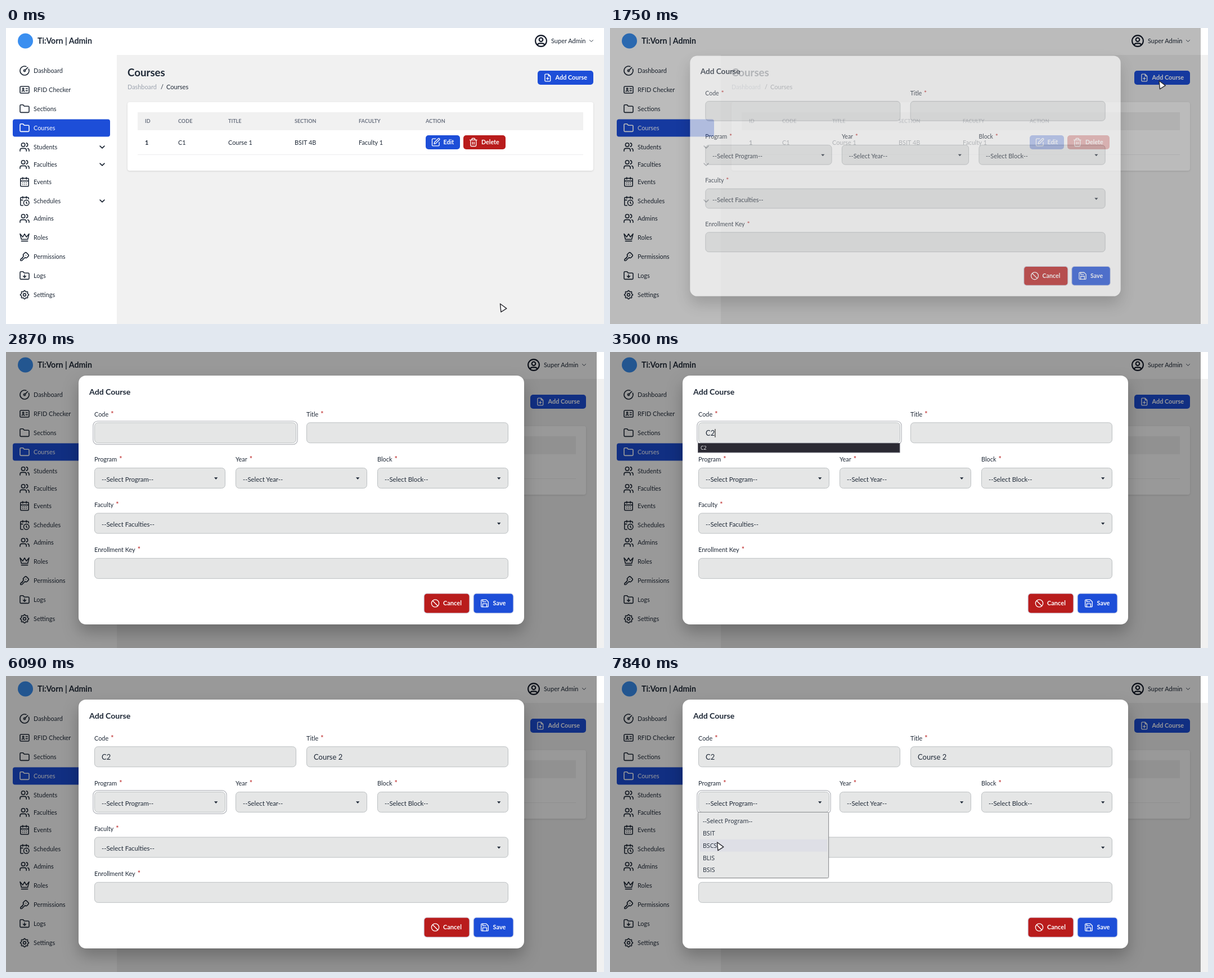
These frames come from a looping animation (1063 by 527 pixels, 8 s). An HTML page:

```html
<!DOCTYPE html>
<html lang="en">
<head>
<meta charset="utf-8">
<title>Course admin</title>
<style>
  html, body { margin: 0; width: 100%; height: 100%; overflow: hidden; background: #fff; }
  svg { display: block; width: 100%; height: 100%; }
  text { white-space: pre; }
  .card { filter: drop-shadow(0 1px 1.5px rgba(0, 0, 0, .12)); }
  .dialog { filter: drop-shadow(0 14px 14px rgba(0, 0, 0, .25)); }
</style>
</head>
<body>
<svg id="stage" viewBox="0 0 1063 527" preserveAspectRatio="none"></svg>
<script>
const LOOP = 8000, OPEN = 1690, GUTTER = 13;
const BLUE = '#1d4ed8', RED = '#b91c1c', INK = '#1f2937', FIELD = '#e5e6e6', PAGE = '#f1f1f1';
const UI = 'Lato, sans-serif', NATIVE = 'Open Sans, sans-serif';
const stage = document.getElementById('stage');
const pen = document.createElement('canvas').getContext('2d');

// Icons on a 24 unit grid
const ring = (x, y, r) => `M${x - r} ${y}a${r} ${r} 0 1 0 ${2 * r} 0a${r} ${r} 0 1 0 ${-2 * r} 0z`;
const gear = 'M' + Array.from({ length: 97 }, (_, i) => {
  const a = i / 96 * 2 * Math.PI, r = 8.3 + 1.1 * Math.cos(8 * a);
  return (12 + r * Math.cos(a)).toFixed(2) + ' ' + (12 + r * Math.sin(a)).toFixed(2);
}).join('L') + 'z';
const folder = 'M4 20h16a2 2 0 0 0 2-2V8a2 2 0 0 0-2-2h-7.9a2 2 0 0 1-1.7-.9l-.8-1.2A2 2 0 0 0 7.9 3H4a2 2 0 0 0-2 2v13a2 2 0 0 0 2 2z';
const icons = {
  gauge: 'M15.6 2.7a10 10 0 1 0 5.7 5.7M13.4 10.6 19 5' + ring(12, 12, 2),
  badge: 'M4 4.5h16a2 2 0 0 1 2 2v11a2 2 0 0 1-2 2H4a2 2 0 0 1-2-2v-11a2 2 0 0 1 2-2zM6 15.5q3-3 6 0M15 9.5h3.5M15 14h3.5' + ring(9, 10, 1.6),
  folder,
  users: 'M16 21v-2a4 4 0 0 0-4-4H6a4 4 0 0 0-4 4v2M22 21v-2a4 4 0 0 0-3-3.9M16 3.1a4 4 0 0 1 0 7.8' + ring(9, 7, 4),
  calendar: 'M5 4h14a2 2 0 0 1 2 2v14a2 2 0 0 1-2 2H5a2 2 0 0 1-2-2V6a2 2 0 0 1 2-2zM16 2v4M8 2v4M3 10h18M8 14h.01M12 14h.01M16 14h.01M8 18h.01M12 18h.01M16 18h.01',
  schedule: 'M21 7.5V6a2 2 0 0 0-2-2H5a2 2 0 0 0-2 2v14a2 2 0 0 0 2 2h3.5M16 2v4M8 2v4M3 10h5M17.5 17.5 16 16.2V14' + ring(16, 16, 6),
  crown: 'M2 4l3 12h14l3-12-6 7-4-7-4 7zM5 20h14',
  key: 'M16.5 3.8l3.6 3.6a2.9 2.9 0 0 1 0 4.1l-2.6 2.6a2.9 2.9 0 0 1-4.1 0l-.3-.3-6.5 6.6a2 2 0 0 1-1.4.6H4a1 1 0 0 1-1-1v-1.2a2 2 0 0 1 .6-1.4L4 17h2v-2h2v-2l2.1-2.1-.3-.3a2.9 2.9 0 0 1 0-4.1l2.6-2.7a2.9 2.9 0 0 1 4.1 0zM15 9h.01',
  download: folder + 'M12 10v6M9 13l3 3 3-3',
  gear: gear + ring(12, 12, 3),
  user: ring(12, 12, 9) + ring(12, 10, 3) + 'M6.2 18.8a4 4 0 0 1 3.8-2.8h4a4 4 0 0 1 3.8 2.8',
  addFile: 'M14 3v4a1 1 0 0 0 1 1h4M17 21H7a2 2 0 0 1-2-2V5a2 2 0 0 1 2-2h7l5 5v11a2 2 0 0 1-2 2zM12 11v6M9 14h6',
  edit: 'M12 3H5a2 2 0 0 0-2 2v14a2 2 0 0 0 2 2h14a2 2 0 0 0 2-2v-7M18.4 2.6a2.1 2.1 0 0 1 3 3L12 15l-4 1 1-4z',
  trash: 'M3 6h18M19 6v14a2 2 0 0 1-2 2H7a2 2 0 0 1-2-2V6M8 6V4a2 2 0 0 1 2-2h4a2 2 0 0 1 2 2v2M10 11v6M14 11v6',
  ban: ring(12, 12, 9.5) + 'M5.3 5.3l13.4 13.4',
  save: 'M19 21H5a2 2 0 0 1-2-2V5a2 2 0 0 1 2-2h11l5 5v11a2 2 0 0 1-2 2zM17 21v-8H7v8M7 3v5h8',
  chevron: 'M6 9l6 6 6-6'
};

// Drawing helpers
const rect = (x, y, w, h, r, fill, extra = '') =>
  `<rect x="${x}" y="${y}" width="${w}" height="${h}" rx="${r}" fill="${fill}" ${extra}/>`;
const text = (x, y, str, size = 10.9, fill = INK, weight = 400, font = UI) =>
  `<text x="${x}" y="${y}" font-size="${size}" fill="${fill}" font-weight="${weight}" font-family="${font}">${str}</text>`;
const icon = (name, cx, cy, scale = .8, color = INK, width = 2) =>
  `<path d="${icons[name]}" transform="translate(${cx} ${cy}) scale(${scale}) translate(-12 -12)" fill="none" stroke="${color}" stroke-width="${width}" stroke-linecap="round" stroke-linejoin="round"/>`;
const button = (x, y, w, h, fill, name, label, labelX, size = 10.7, extra = '') =>
  rect(x, y, w, h, 5, fill, extra) + icon(name, x + (h > 30 ? 20 : 17.8), y + h / 2, .7, '#fff', 1.9) +
  text(labelX, y + h / 2 + 3.8, label, size, '#fff', 700);

// Timeline
const clamp = v => Math.min(1, Math.max(0, v));
const smooth = v => v * v * (3 - 2 * v);
const lerp = (a, b, p) => a + (b - a) * p;
const latest = (keys, t) => keys.filter(k => k[0] <= t).pop();

const pointerPath = [
  [640, 878.5, 491], [1400, 981.5, 91.5], [OPEN, 981.5, 91.5], [1820, 969.5, 97], [2370, 410, 141],
  [6400, 410, 140], [6790, 211.5, 224], [7170, 211.5, 224], [7490, 214, 349], [7600, 214, 349], [7840, 190.5, 296]
];
function pointerAt(t) {
  const next = pointerPath.findIndex(k => k[0] > t);
  if (next === 0) return pointerPath[0].slice(1);
  if (next < 0) return pointerPath.at(-1).slice(1);
  const [t0, x0, y0] = pointerPath[next - 1], [t1, x1, y1] = pointerPath[next];
  const p = smooth((t - t0) / (t1 - t0));
  return [lerp(x0, x1, p), lerp(y0, y1, p)];
}

const inputs = [
  { x: 157, leave: 3780, keys: [[2370, ''], [3010, 'C'], [3360, 'C2']],
    history: ['C1', 'C2', 'C3', 'C4', 'C5', 'C6'] },
  { x: 534, leave: 6090,
    keys: [[3780, ''], [4550, 'C'], [4690, 'Co'], [4900, 'Cou'], [4970, 'Cour'], [5040, 'Cours'],
      [5180, 'Course'], [5390, 'Course '], [5600, 'Course 2']],
    history: ['Cap', 'Capstone', 'Capstone Project 1', 'Capstone Project 2', 'Computer Programming',
      'Computer Programming 2', 'Course 1', 'Course 2', 'Course 3'] }
];

const menu = [
  ['gauge', 'Dashboard', 76], ['badge', 'RFID Checker', 110], ['folder', 'Sections', 144], ['folder', 'Courses', 178],
  ['users', 'Students', 212, 1], ['users', 'Faculties', 243, 1], ['calendar', 'Events', 274],
  ['schedule', 'Schedules', 308, 1], ['users', 'Admins', 339], ['crown', 'Roles', 373],
  ['key', 'Permissions', 407], ['download', 'Logs', 441], ['gear', 'Settings', 475]
];
const columns = [
  [247, 'ID', '1'], [306, 'CODE', 'C1'], [395, 'TITLE', 'Course 1'], [513, 'SECTION', 'BSIT 4B'],
  [627, 'FACULTY', 'Faculty 1'], [746, 'ACTION', '']
];

function page(t, [px, py]) {
  const open = t >= OPEN, shift = open ? GUTTER : 0;
  const hover = !open && px > 945 && py < 101;
  const press = t >= 1660 && !open ? .97 : 1;
  const sidebar = menu.map(([name, label, y, nested]) => {
    const active = label === 'Courses', color = active ? '#fff' : INK;
    return (active ? rect(12, 162.5, 173, 31, 4, BLUE) : '') + icon(name, 33, y, .8, color) +
      text(49, y + 4, label, 10.9, color) + (nested ? icon('chevron', 171, y, .65, INK, 2.6) : '');
  }).join('');
  const table = columns.map(([x, head, cell], i) =>
    text(x, 168.8, head, 9.1, '#6b7280', 700) + text(x, 207.5, cell, 10.9, INK, i ? 400 : 700)).join('');
  return rect(0, 0, 1063, 527, 0, '#fff') + rect(197, 48, 866, 479, 0, PAGE) +
    '<circle cx="34.5" cy="23" r="13.5" fill="#3b8ff0"/>' +
    text(56, 28, 'Ti:Vorn | Admin', 14.2, INK, 700) +
    icon('user', 951 - shift, 23, 1.1, '#111827', 1.9) + text(969 - shift, 27, 'Super Admin', 11) +
    icon('chevron', 1040.5 - shift, 23, .5, INK, 1.8) + sidebar +
    text(216, 86, 'Courses', 18.7, INK, 700) + text(216, 109.3, 'Dashboard', 10.9, '#9ca3af') +
    text(275, 109.3, '/') + text(285, 109.3, 'Courses', 11.1) +
    `<g transform="translate(${994.5 - shift} 88.5) scale(${press}) translate(-994.5 -88.5)">` +
    button(945, 76, 99, 25, hover ? '#3b82f6' : BLUE, 'addFile', 'Add Course', 976.5, 10.9) + '</g>' +
    rect(216, 132, 828 - shift, 122, 4, '#fff', 'class="card"') + rect(234, 150, 792 - shift, 32, 0, PAGE) +
    rect(234, 225, 792 - shift, 1, 0, '#ededee') + table +
    button(746, 191, 61, 25, BLUE, 'edit', 'Edit', 777.5) +
    button(813, 191, 75, 25, RED, 'trash', 'Delete', 845);
}

const label = (x, y, str) => text(x, y, `${str}<tspan dx="4" font-size="12.5" fill="${RED}">*</tspan>`);
const field = (x, y, w, focused) =>
  (focused ? rect(x - 2.2, y - 2.2, w + 4.4, 41.4, 8, '#fff', 'stroke="#bcbec3" stroke-width="1.4"') : '') +
  rect(x + .5, y + .5, w - 1, 36, 6, FIELD, 'stroke="#bcc0c2"');
const select = (x, y, w, str, focused) => field(x, y, w, focused) + text(x + 13, y + 24.6, str, 11.4) +
  `<path d="M${x + w - 20} ${y + 17.3}h6.4l-3.2 3.6z" fill="${INK}"/>`;

function suggestions(x, items) {
  const shown = items.slice(0, 6), h = shown.length * 15.4 + 1;
  const bar = items.length > 6
    ? rect(x + 344.5, 175.5, 13, 22, 0, '#8f8f96') +
      `<path d="M${x + 347.5} 171l3-3 3 3M${x + 347.5} 248l3 3 3-3" fill="none" stroke="#a5a5ad" stroke-width="1.4"/>` : '';
  return rect(x - .5, 162.5, 358.5, h, 0, '#2b2a33', 'stroke="#5b5b66"') +
    shown.map((s, i) => text(x + 4, 174.2 + i * 15.45, s, 8.8, '#fbfbfe', 400, NATIVE)).join('') + bar;
}

function textInput({ x, leave, keys, history }, t) {
  const key = latest(keys, t), focused = key && t < leave;
  const value = key ? key[1] : '';
  let box = field(x, 125.3, 359, focused) + text(x + 13, 148.8, value, 13), popup = '';
  if (focused) {
    pen.font = '13px ' + UI;
    const end = x + 13.2 + pen.measureText(value).width;
    if ((t - key[0]) % 1000 < 495) box += rect(end, 137, 1, 15, 0, '#111');
    if (value) popup = suggestions(x, history.filter(s => s.startsWith(value)));
  }
  return [box, popup];
}

function programList(y) {
  const row = Math.max(0, Math.floor((y - 247) / 21.9));
  return rect(156.5, 242.5, 232, 117, 2, '#e6e7e7', 'stroke="#8d8f92" class="card"') +
    rect(160, 247 + row * 21.9, 226, 21.9, 0, '#dedfe6') +
    ['--Select Program--', 'BSIT', 'BSCS', 'BLIS', 'BSIS'].map((s, i) =>
      text(165, 261.8 + i * 21.9, s, 10.6, INK, 400, NATIVE)).join('');
}

function dialog(t, pointer) {
  const p = 1 - (1 - clamp((t - OPEN) / 200)) ** 3;
  const [code, title] = inputs.map(input => textInput(input, t));
  const edge = 'stroke="#d5d9ea" stroke-width="1.2"';
  return rect(0, 0, 1050, 527, 0, '#000', `opacity="${.4 * p}"`) +
    `<g opacity="${p}" transform="translate(525 263.5) scale(${.9 + .1 * p}) translate(-525 -263.5)">` +
    rect(129, 42, 792, 443, 13, '#fff', 'class="dialog"') + text(148, 76.2, 'Add Course', 14.1, INK, 700) +
    label(157, 114.8, 'Code') + label(534, 114.8, 'Title') + code[0] + title[0] +
    label(157, 195, 'Program') + label(408, 195, 'Year') + label(660, 195, 'Block') +
    select(157, 206, 233, '--Select Program--', t >= 6090) + select(408, 206, 234, '--Select Year--') +
    select(660, 206, 233, '--Select Block--') +
    label(157, 275.6, 'Faculty') + select(157, 286.5, 736, '--Select Faculties--') +
    label(157, 356, 'Enrollment Key') + field(157, 366.8, 736) +
    button(743, 430, 81, 35, RED, 'ban', 'Cancel', 777, 11, edge) +
    button(831, 430, 71, 35, BLUE, 'save', 'Save', 865.5, 11, edge) +
    code[1] + title[1] + (t >= 7000 ? programList(pointer[1]) : '') + '</g>';
}

function scene(t) {
  const pointer = pointerAt(t), hidden = t >= 2370 && t < 6430;
  return page(t, pointer) + (t >= OPEN ? dialog(t, pointer) : '') + (hidden ? '' :
    `<path d="M0 0L11.3 8.4L1.4 14.6z" transform="translate(${pointer})" fill="#fff" stroke="#2d2d33" stroke-width="1.5" stroke-linejoin="round"/>`);
}

let drawn = '';
function frame() {
  const markup = scene(performance.now() % LOOP);
  if (markup !== drawn) stage.innerHTML = drawn = markup;
  requestAnimationFrame(frame);
}
frame();
</script>
</body>
</html>
```
